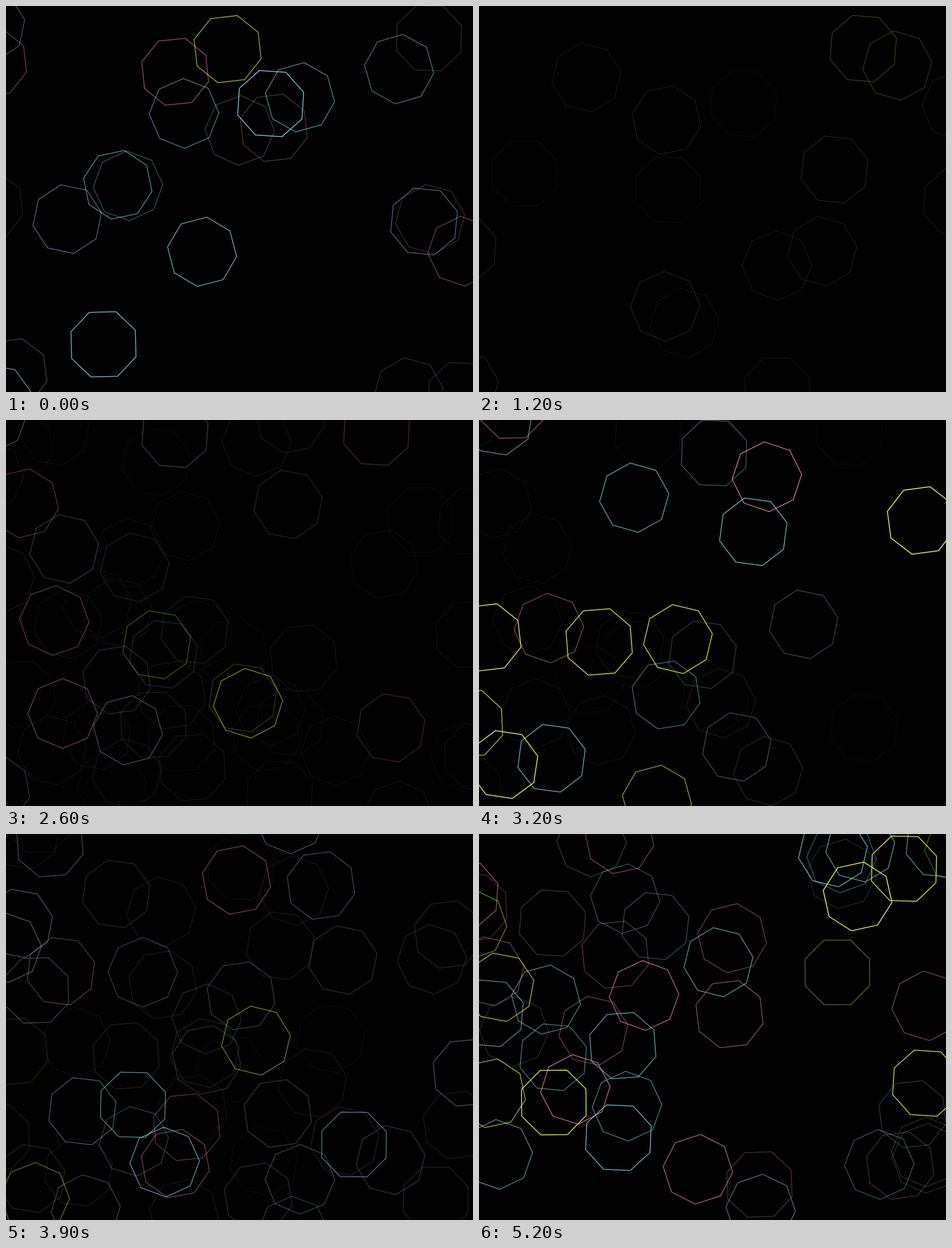
An HTML page with a canvas that plays this animation: 824 by 680 pixels, repeating every 5300 ms.

```html
<!DOCTYPE html>
<html lang="en">
<head>
<meta charset="utf-8">
<title>Fading octagons</title>
<style>
  html, body { margin: 0; height: 100%; overflow: hidden; background: #020202; }
  canvas { display: block; }
</style>
</head>
<body>
<canvas id="stage" width="824" height="680"></canvas>
<script>
const LOOP = 5300, STEP = 100, RADIUS = 61.5;
const KEEP = 0.76;      // share of brightness left after each step
const BUILD_UP = 550;   // longest time a burst takes to gather, in ms
const CYAN = '#8fe3fb', YELLOW = '#e6ff46', PINK = '#ff8cbe';
const ctx = document.getElementById('stage').getContext('2d');

// Each burst peaks at `at` with brightness `glow`. Its leading octagons
// (x, y, tilt in degrees) are joined by `extras` dimmer, scattered ones.
const bursts = [
  { at: 0, glow: 0.85, extras: 20, leads: [
    [CYAN, 467, 172, -19], [CYAN, 172, 596, 21], [CYAN, 346, 433, 8], [YELLOW, 391, 76, 16]] },
  { at: 1200, glow: 0.22, extras: 14, leads: [
    [YELLOW, 678, 75, -18], [YELLOW, 738, 105, -6]] },
  { at: 1800, glow: 0.9, extras: 38, leads: [
    [YELLOW, 260, 537, 21], [YELLOW, 502, -2, 11], [CYAN, 213, 623, -8],
    [CYAN, 329, 612, 18], [CYAN, 442, 38, 1], [CYAN, 525, 420, 17]] },
  { at: 2600, glow: 0.5, extras: 18, leads: [
    [YELLOW, 427, 499, -5], [PINK, 100, 517, 0]] },
  { at: 3200, glow: 1, extras: 12, leads: [
    [YELLOW, 780, 177, 15], [YELLOW, 44, 607, -14], [YELLOW, 15, 383, 16], [YELLOW, 212, 391, 18],
    [YELLOW, 351, 386, -9], [PINK, 508, 100, -4], [CYAN, 484, 197, -15], [CYAN, 128, 596, -15]] },
  { at: 3900, glow: 0.62, extras: 32, leads: [
    [CYAN, 280, 578, -2], [CYAN, 224, 477, -21], [CYAN, 614, 547, -22], [YELLOW, 441, 364, -9]] },
  { at: 5200, glow: 1, extras: 40, leads: [
    [YELLOW, 668, 110, 10], [YELLOW, 132, 473, 22], [YELLOW, 750, 61, -21],
    [YELLOW, 788, 439, -19], [CYAN, 246, 535, -20], [PINK, 170, 450, -5]] },
];

let seed = 7;
function random() {
  seed = (seed + 0x6d2b79f5) | 0;
  let t = Math.imul(seed ^ (seed >>> 15), 1 | seed);
  t = (t + Math.imul(t ^ (t >>> 7), 61 | t)) ^ t;
  return ((t ^ (t >>> 14)) >>> 0) / 4294967296;
}

// Mostly cyan, denser towards the left edge.
function scattered() {
  const pick = random();
  const color = pick < 0.65 ? CYAN : pick < 0.85 ? PINK : YELLOW;
  return [color, 880 * random() ** 1.5 - 30, 740 * random() - 30, 45 * random()];
}

function fadeRow(shapes, at, from, to) {
  return shapes.map(([color, x, y, tilt], i) => {
    const level = from + (to - from) * i / shapes.length;
    const age = STEP * Math.log(level) / Math.log(KEEP);
    return { color, x, y, tilt, at, level, born: at - Math.min(BUILD_UP, age) };
  });
}

const stamps = bursts.flatMap(({ at, glow, extras, leads }) => [
  ...fadeRow(Array.from({ length: extras }, scattered), at, glow * 0.7, glow * 0.15),
  ...fadeRow(leads, at, glow, glow * 0.65),
]);

function octagon({ x, y, tilt, color }, alpha) {
  ctx.globalAlpha = alpha;
  ctx.strokeStyle = color;
  ctx.beginPath();
  for (let i = 0; i < 8; i++) {
    const a = (tilt + i * 45) * Math.PI / 180;
    ctx.lineTo(x + RADIUS * Math.sin(a), y - RADIUS * Math.cos(a));
  }
  ctx.closePath();
  ctx.stroke();
}

ctx.lineWidth = 1.5;
const start = performance.now();

function draw() {
  const elapsed = (performance.now() - start) % LOOP;
  const time = Math.floor(elapsed / STEP) * STEP;
  ctx.globalAlpha = 1;
  ctx.fillStyle = '#020202';
  ctx.fillRect(0, 0, 824, 680);
  for (const stamp of stamps) {
    const alpha = stamp.level * KEEP ** ((time - stamp.at) / STEP);
    if (time >= stamp.born && alpha > 0.03) octagon(stamp, Math.min(1, alpha));
  }
  requestAnimationFrame(draw);
}
draw();
</script>
</body>
</html>
```
